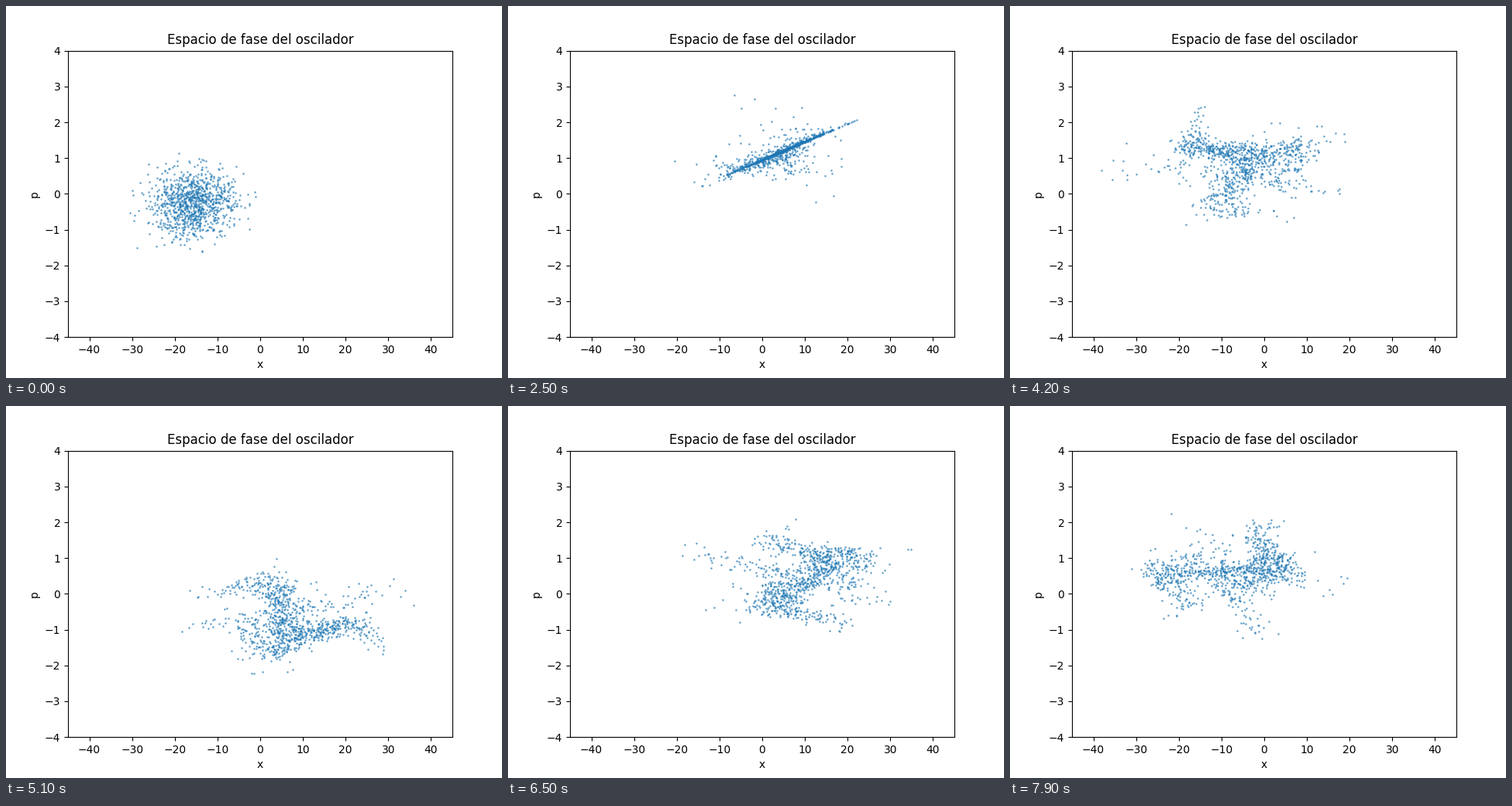
A matplotlib script that plays this animation: 640x480 px, repeating every 8000 ms.

```python
import numpy as np
import matplotlib.pyplot as plt
from matplotlib.animation import FuncAnimation

plt.rcParams["text.kerning_factor"] = 6

N = 1000
FRAMES, STEP = 80, 100
OMEGA = np.radians(190.5)   # clockwise turn of the cloud per second
DRIFT = np.radians(162.5)   # slower turn of its long axis
K = 16                      # x units per unit of p
SQUEEZE = 2.5               # time at which the cloud is thinnest

rng = np.random.default_rng(11)
along, across = np.fmod(rng.normal(size=(2, N)), 3)


def ease(t, start, end):
    u = np.clip((t - start) / (end - start), 0, 1)
    return u * u * (3 - 2 * u)


def center(t):
    """Mean position, turning with a radius that breathes."""
    radius = np.interp(t, [0, 0.9, 2.5, 4.2, 6.5, 7.9],
                       [16.3, 10.6, 18.6, 13.8, 12, 12.5])
    return radius * np.exp(1j * (np.radians(195) - OMEGA * t))


def spread(t):
    """Offsets from the mean: fold the cloud, squeeze it, then widen it."""
    fold = ease(t, 1, 4)
    thin = np.exp(-(t - SQUEEZE) ** 2)
    a = along + fold * np.sin(2.2 * across + 0.5 * t)
    b = across + 0.8 * fold * np.sin(1.7 * a - 0.4 * t)
    b = np.sign(b) * np.abs(b) ** (1 + 2 * thin)
    width = (5 + 2.6 * ease(t, 2.5, 4.2)) * (1 - 0.84 * thin)
    axis = np.radians(85) - DRIFT * t
    return (7.6 * a + 1j * width * b) * np.exp(1j * axis)


fig, ax = plt.subplots(figsize=(6.4, 4.8), dpi=100)
ax.set(xlim=(-45, 45), ylim=(-4, 4), xlabel="x", ylabel="p",
       title="Espacio de fase del oscilador")
dots, = ax.plot([], [], ".", color="C0", markersize=2, alpha=0.5)


def update(frame):
    t = frame * STEP / 1000
    z = center(t) + spread(t)
    dots.set_data(z.real, z.imag / K)
    return dots,


anim = FuncAnimation(fig, update, frames=FRAMES, interval=STEP,
                     repeat=True, repeat_delay=0)
plt.show()
```
